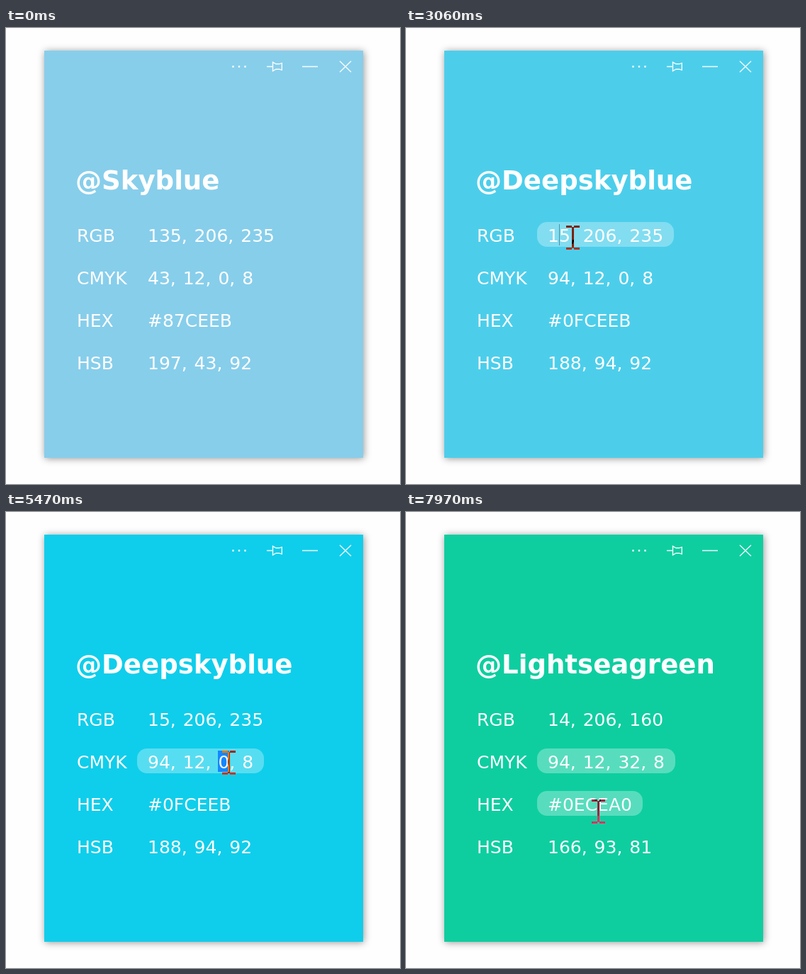
Write an HTML page with a canvas that moves like this. It is 556x644 px and loops after 8 s.

```html
<!DOCTYPE html>
<html lang="en">
<head>
<meta charset="utf-8">
<title>Colour card</title>
<style>
html, body { margin: 0; width: 100%; height: 100%; overflow: hidden; background: #fefefe; }
canvas { display: block; }
</style>
</head>
<body>
<canvas id="stage" width="556" height="644"></canvas>
<script>
const ctx = document.getElementById('stage').getContext('2d');
const LOOP = 8000;
const FONT = '"DejaVu Sans", Verdana, sans-serif';
const LABELS = ['RGB', 'CMYK', 'HEX', 'HSB'];
const LEFT = 200, PAD = 15;
const RGB = 0, CMYK = 1;

// Card contents from each moment on
const CARDS = [
  { at: 0, title: '@Skyblue', rows: ['135, 206, 235', '43, 12, 0, 8', '#87CEEB', '197, 43, 92'] },
  { at: 2760, title: '@Deepskyblue', rows: ['15, 206, 235', '94, 12, 0, 8', '#0FCEEB', '188, 94, 92'] },
  { at: 6160, title: '@Darkturquoise', rows: ['14, 206, 228', '94, 12, 3, 8', '#0ECEE4', '186, 94, 89'] },
  { at: 6480, title: '@Lightseagreen', rows: ['14, 206, 160', '94, 12, 32, 8', '#0ECEA0', '166, 93, 81'] }
];

// Background fades: colour progress is held between ticks
const SKY = [135, 206, 235], DEEP = [15, 206, 235], SEA = [14, 206, 160];
const FADES = [
  { start: 2907, ticks: [2930, 2990, 3060, 3110, 3170, 3240], from: SKY, to: DEEP },
  { start: 6627, ticks: [6730, 6830, 6900, 6980], from: DEEP, to: SEA }
];
const FADE_TIME = 313;

// Pointer moves: start, end, number of steps, target, optional bend
const MOVES = [
  { t0: 150, t1: 810, n: 14, to: [239.5, 300], bend: [262, 400] },
  { t0: 1650, t1: 1700, n: 2, to: [235.5, 296] },
  { t0: 3730, t1: 4180, n: 8, to: [280.5, 358] },
  { t0: 4410, t1: 4480, n: 3, to: [300.5, 358] },
  { t0: 4790, t1: 4840, n: 2, to: [308.5, 358] },
  { t0: 5090, t1: 5140, n: 2, to: [304.5, 356] },
  { t0: 5300, t1: 5470, n: 4, to: [314.5, 354] },
  { t0: 7170, t1: 7970, n: 17, to: [271.5, 423], bend: [338, 392] }
];
const POINTER_START = [275, 665];

// Selections and carets: row, character range, time span
const SELECTIONS = [
  { row: RGB, a: 0, b: 13, t0: 1300, t1: 1900 },
  { row: CMYK, a: 0, b: 12, t0: 4250, t1: 4890 },
  { row: CMYK, a: 8, b: 9, t0: 5470, t1: 6160 }
];
const CARETS = [
  { row: RGB, at: 2, t0: 1900, t1: 2400, color: '#44606e' },
  { row: RGB, at: 1, t0: 2760, t1: 3240, color: '#4a92a6' },
  { row: CMYK, at: 8, t0: 4890, t1: 5390, color: '#3f9fc8' },
  { row: CMYK, at: 9, t0: 6160, t1: 6480, color: '#3f9fc8' },
  { row: CMYK, at: 10, t0: 6480, t1: 6980, color: '#2f9be0' }
];

const during = (t, e) => t >= e.t0 && t < e.t1;
const mix = (a, b, p) => a.map((v, i) => v + (b[i] - v) * p);
const rowTop = row => 274 + 60 * row;

function background(t) {
  let color = SKY;
  for (const f of FADES) {
    const tick = f.ticks.filter(k => k <= t).pop();
    if (tick) color = mix(f.from, f.to, Math.min(1, (tick - f.start) / FADE_TIME));
  }
  return `rgb(${color.map(Math.round)})`;
}

function pointer(t) {
  let pos = POINTER_START;
  for (const m of MOVES) {
    if (t < m.t0) break;
    const step = Math.floor((t - m.t0) / (m.t1 - m.t0) * (m.n - 1)) + 1;
    const p = Math.min(1, step / m.n);
    pos = m.bend ? mix(mix(pos, m.bend, p), mix(m.bend, m.to, p), p) : mix(pos, m.to, p);
  }
  return pos;
}

function rowFont() {
  ctx.font = '25px ' + FONT;
  ctx.wordSpacing = '2px';
}

const textWidth = s => ctx.measureText(s).width;
const charX = (text, i) => Math.round(LEFT + textWidth(text.slice(0, i)) - 0.3);

function drawWindow(color) {
  ctx.fillStyle = '#fefefe';
  ctx.fillRect(0, 0, 556, 644);
  ctx.save();
  ctx.shadowColor = 'rgba(0,0,0,.42)';
  ctx.shadowBlur = 10;
  ctx.shadowOffsetX = 1;
  ctx.shadowOffsetY = 1;
  ctx.fillStyle = color;
  ctx.fillRect(54, 32, 450, 575);
  ctx.restore();
}

function drawIcons() {
  ctx.fillStyle = '#fff';
  for (const x of [320.5, 329, 337.5]) ctx.fillRect(x - 1.2, 53.3, 2.4, 2.4);
  ctx.strokeStyle = 'rgba(255,255,255,.95)';
  ctx.lineWidth = 1.4;
  ctx.stroke(new Path2D('M368 54.5H376.5M376.5 48.3V60.7L381 58.2H385.5L389.3 59.3V49.7L385.5 50.8H381Z'));
  ctx.stroke(new Path2D('M418 54.5H440M471 46.8L487 62.2M487 46.8L471 62.2'));
}

function drawPill(row, text) {
  ctx.fillStyle = 'rgba(255,255,255,.3)';
  ctx.beginPath();
  ctx.roundRect(LEFT - PAD, rowTop(row), Math.round(textWidth(text)) + 2 * PAD, 35, 14);
  ctx.fill();
}

function drawBeam(x, y) {
  ctx.save();
  ctx.globalCompositeOperation = 'difference';
  ctx.fillStyle = '#fff';
  const l = Math.round(x - 9.5), t = Math.round(y - 17);
  for (const bar of [t, t + 31]) {
    ctx.fillRect(l, bar, 8, 3);
    ctx.fillRect(l + 11, bar, 8, 3);
  }
  ctx.fillRect(l + 8, t + 2, 3, 30);
  ctx.restore();
}

function drawArrow(x, y) {
  ctx.save();
  ctx.translate(Math.round(x), Math.round(y));
  const shape = new Path2D('M1 1V31L8 24.5L12.5 35L17 33L12.5 23H22Z');
  ctx.fillStyle = '#fff';
  ctx.strokeStyle = '#000';
  ctx.lineWidth = 1.5;
  ctx.fill(shape);
  ctx.stroke(shape);
  ctx.restore();
}

function draw(t) {
  const card = CARDS.filter(c => c.at <= t).pop();
  const [px, py] = pointer(t);
  const focus = t < 1300 ? -1 : t < 4250 ? RGB : CMYK;

  drawWindow(background(t));
  drawIcons();

  rowFont();
  let hover = -1;
  card.rows.forEach((text, row) => {
    const right = LEFT + textWidth(text) + PAD;
    if (px >= LEFT - PAD && px < right && py >= rowTop(row) && py < rowTop(row) + 35) hover = row;
    if (row === hover || row === focus) drawPill(row, text);
  });

  for (const s of SELECTIONS.filter(s => during(t, s))) {
    const text = card.rows[s.row], x = charX(text, s.a);
    ctx.fillStyle = '#1487ff';
    ctx.fillRect(x, rowTop(s.row) + 3, charX(text, s.b) - x, 30);
  }

  ctx.fillStyle = '#fff';
  card.rows.forEach((text, row) => {
    ctx.fillText(LABELS[row], 100, rowTop(row) + 28);
    ctx.fillText(text, LEFT, rowTop(row) + 28);
  });

  for (const c of CARETS.filter(c => during(t, c))) {
    ctx.fillStyle = c.color;
    ctx.fillRect(charX(card.rows[c.row], c.at), rowTop(c.row) + 3, 1, 30);
  }

  ctx.fillStyle = '#fff';
  ctx.wordSpacing = '0px';
  ctx.font = 'bold 37.1px ' + FONT;
  ctx.fillText(card.title, 98, 228);

  (hover < 0 ? drawArrow : drawBeam)(px, py);
}

let origin;
function tick(now) {
  origin ??= now;
  draw((now - origin) % LOOP);
  requestAnimationFrame(tick);
}
requestAnimationFrame(tick);
</script>
</body>
</html>
```
